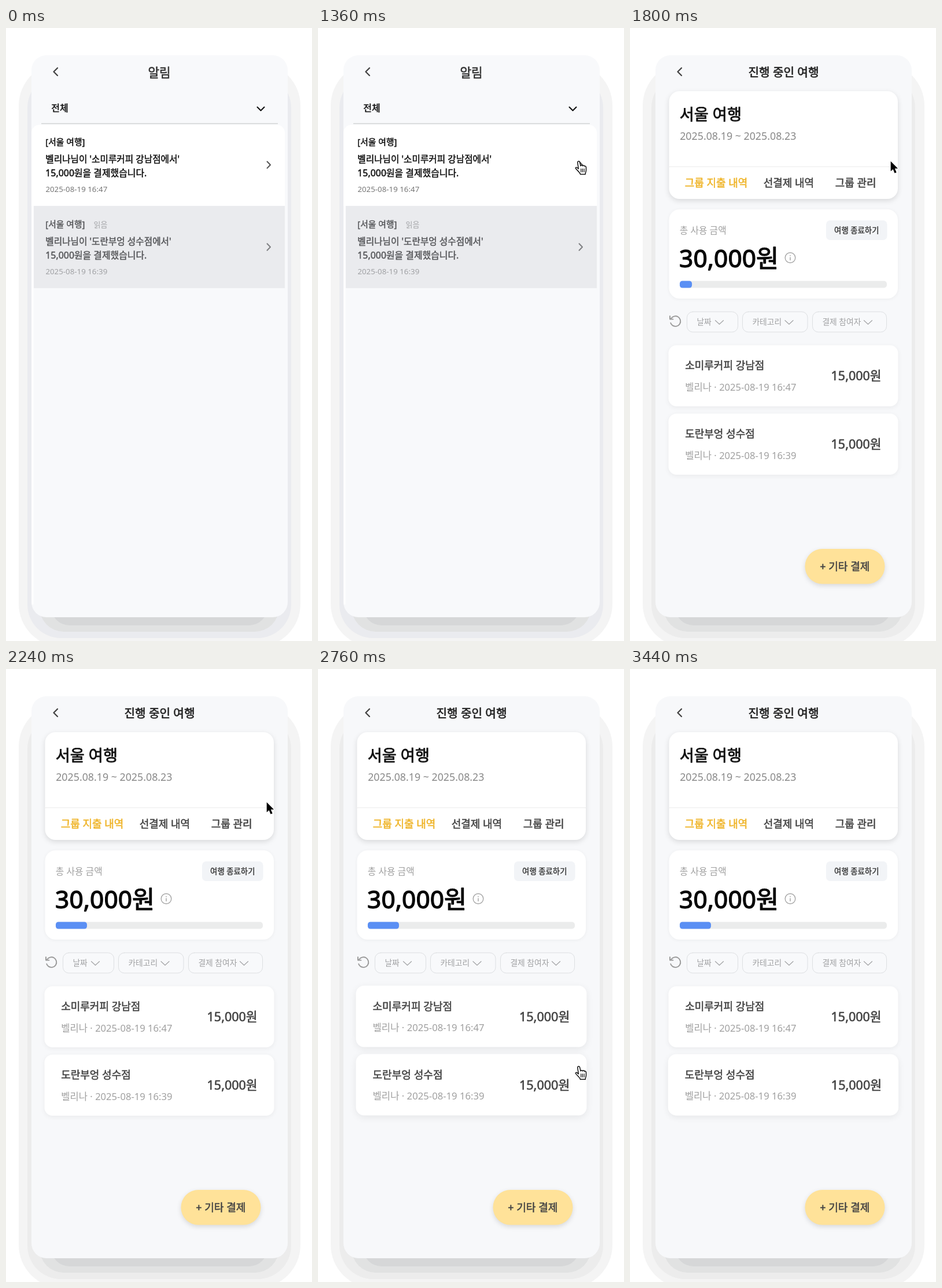
An HTML page with a canvas that plays this animation: 529 px wide and 1058 px high, repeating every 3.48 s.

```html
<!DOCTYPE html>
<html lang="ko">
<head>
<meta charset="utf-8">
<style>
html, body { margin: 0; width: 100%; height: 100%; overflow: hidden; background: #fff; }
canvas { display: block; }
</style>
</head>
<body>
<canvas id="stage" width="529" height="1058"></canvas>
<script>
const ctx = document.getElementById('stage').getContext('2d');
const FONT = '"Noto Sans", "Noto Sans CJK KR", "Noto Sans CJK", sans-serif';
const LOOP = 3480;
const CURSOR_IN = 1280, PAGE_SWITCH = 1600, DATA_LOADED = 1680;
const MOVE_START = 2240, MOVE_END = 2790, CURSOR_OUT = 3280;
const USER = '벨리나', CAFE = '소미루커피 강남점', DINER = '도란부엉 성수점';

const HAND = new Path2D('M-2 1.8C-2-.6 1.3-.6 1.8 1.6L3.3 8C3.6 6.5 6 6.4 6.7 8C7.4 6.8 9.4 7 10 8.6' +
  'C11.2 7.8 12.7 8.6 12.8 10.5V15.5C12.8 18 11.6 19 11.4 22.5H2.8C2.5 19.5-1.5 17-5.2 12.5C-6 10.8-4.3 9.8-2.8 11L-.4 13Z');
const FOLDS = new Path2D('M4 13V18.5M6.7 13V18.5M9.4 13V18.5');
const ARROW = new Path2D('M0 0V17.3L4 13.7L6.8 20.6L10 19.2L7.1 12.6H12.4Z');

const clamp = x => Math.max(0, Math.min(1, x));

// CSS "ease": cubic-bezier(.25, .1, .25, 1)
function ease(x) {
  x = clamp(x);
  if (x === 0 || x === 1) return x;
  const bezier = (s, a, b) => 3 * s * (1 - s) ** 2 * a + 3 * s * s * (1 - s) * b + s ** 3;
  let lo = 0, hi = 1;
  for (let i = 0; i < 20; i++) {
    const mid = (lo + hi) / 2;
    if (bezier(mid, 0.25, 0.25) < x) lo = mid; else hi = mid;
  }
  return bezier(lo, 0.1, 1);
}

// Transition that starts at `enter` and reverses at `leave`.
function hover(t, enter, leave) {
  const v = ease((Math.min(t, leave) - enter) / 300);
  return t < leave || v === 0 ? v : v * (1 - ease((t - leave) / (300 * v)));
}

function box(x, y, w, h, r, fill, stroke) {
  ctx.beginPath();
  ctx.roundRect(x, y, w, h, r);
  if (fill) { ctx.fillStyle = fill; ctx.fill(); }
  if (stroke) { ctx.strokeStyle = stroke; ctx.lineWidth = 1; ctx.stroke(); }
}

function raised(x, y, w, h, r, fill, blur, drop, alpha) {
  ctx.save();
  ctx.shadowColor = `rgba(0,0,0,${alpha})`;
  ctx.shadowBlur = blur;
  ctx.shadowOffsetY = drop;
  box(x, y, w, h, r, fill);
  ctx.restore();
}

// Text placed by its left edge (or middle) and its vertical centre.
function text(str, x, cy, size, color, align = 'left') {
  ctx.font = `${size}px ${FONT}`;
  ctx.textAlign = align;
  ctx.fillStyle = color;
  ctx.fillText(str, align === 'left' ? x - size * 0.045 : x, cy + size * 0.37);
}

// Medium weight: regular glyphs thickened by a thin outline.
function mediumText(str, x, cy, size, color, align = 'left') {
  text(str, x, cy, size, color, align);
  ctx.strokeStyle = color;
  ctx.lineWidth = size * 0.03;
  ctx.lineJoin = 'round';
  ctx.strokeText(str, align === 'left' ? x - size * 0.045 : x, cy + size * 0.37);
}

function line(color, width, ...pts) {
  ctx.strokeStyle = color;
  ctx.lineWidth = width;
  ctx.lineCap = ctx.lineJoin = 'round';
  ctx.beginPath();
  for (let i = 0; i < pts.length; i += 2) ctx.lineTo(pts[i], pts[i + 1]);
  ctx.stroke();
}

function phone(panel, edge) {
  ctx.fillStyle = '#fff';
  ctx.fillRect(0, 0, 529, 1058);
  box(22, 60, 487, 1008, 74, '#f4f4f4');
  box(37, 80, 456, 973, 58, edge);
  box(58, 900, 414, 142, 42, '#e1e2e2');
  box(78, 900, 374, 131, 32, '#d6d7d8');
  box(44, 47, 443, 970, 26, panel);
  line('#444', 2.3, 89, 69, 82.5, 75.5, 89, 82);
}

function notice(y, place, time, read) {
  const main = read ? '#57585b' : '#111';
  mediumText('[서울 여행]', 69, y, 14.8, main);
  if (read) text('읽음', 152, y + 0.5, 13, '#a3a4a7');
  mediumText(`${USER}님이 '${place}에서'`, 69, y + 29.5, 15.7, main);
  mediumText('15,000원을 결제했습니다.', 69, y + 53.5, 15.9, main);
  text(`2025-08-19 ${time}`, 69, y + 81.3, 13.3, read ? '#a0a1a4' : '#777');
  line(read ? '#808184' : '#555', 2, 451.5, y + 34, 457, y + 39.7, 451.5, y + 45.4);
}

function noticesPage() {
  phone('#f8f9fb', '#eaebef');
  mediumText('알림', 265, 77, 21.3, '#333', 'center');
  mediumText('전체', 79, 138, 16, '#111');
  line('#111', 2.1, 434.5, 136.5, 440.5, 142.5, 446.5, 136.5);
  box(44.5, 180, 3, 815, 1, '#fff');
  box(44, 167, 438, 140, [14, 14, 0, 0], '#fff');
  ctx.fillStyle = '#c2c3c4';
  ctx.fillRect(61, 164.5, 409, 1);
  ctx.fillStyle = '#eaebee';
  ctx.fillRect(48, 307, 434, 142);
  notice(196.5, CAFE, '16:47', false);
  notice(338.3, DINER, '16:39', true);
}

function filterChip(x, w, cy, label, arrowX) {
  box(x + 0.5, cy - 17.5, w - 1, 35, 10, '#f8f9fb', '#dddfe2');
  text(label, x + 18, cy, 13.8, '#a0a1a3');
  line('#a5a6a8', 1.3, arrowX, cy - 2.5, arrowX + 7, cy + 4, arrowX + 14, cy - 2.5);
}

function resetIcon(cy) {
  ctx.strokeStyle = '#999';
  ctx.lineWidth = 1.9;
  ctx.beginPath();
  ctx.arc(78.5, cy, 8.8, -2.6, 2.8);
  ctx.stroke();
  line('#999', 1.9, 69, cy - 9, 69, cy - 3.5, 74.5, cy - 3.5);
}

function infoIcon(x, y) {
  ctx.strokeStyle = '#a5a5a5';
  ctx.lineWidth = 1.4;
  ctx.beginPath();
  ctx.arc(x, y, 8.8, 0, Math.PI * 2);
  ctx.stroke();
  line('#a5a5a5', 1.5, x, y - 0.5, x, y + 4);
  line('#a5a5a5', 1.7, x, y - 3.8, x, y - 3.7);
}

function expense(cy, place, time, p) {
  ctx.save();
  ctx.translate(265, cy - 3 * p);
  ctx.scale(1 + 0.02 * p, 1 + 0.02 * p);
  ctx.translate(-265, 0);
  raised(66.5, -52.8, 397, 105.6, 14, '#fff', 8 + 20 * p, 2 + 6 * p, 0.06 + 0.07 * p);
  mediumText(place, 96, -17.4, 18, '#444');
  text(`${USER} · 2025-08-19 ${time}`, 96, 19.3, 16.6, '#a0a0a0');
  mediumText('15,000원', 348.5, 0.3, 21.5, '#444');
  ctx.restore();
}

function tripPage(t) {
  const loaded = t >= DATA_LOADED;
  const shift = loaded ? 10.5 : 0;
  phone('#f7f8fa', '#ececec');
  if (loaded) mediumText('진행 중인 여행', 265.5, 77, 20.2, '#222', 'center');

  raised(67.5, 109, 395.5, 186, 18, '#fff', 10, 3, 0.13);
  mediumText('서울 여행', 87, 149, 27.2, '#111');
  text('2025.08.19 ~ 2025.08.23', 87, 186.3, 17.8, '#888');
  ctx.fillStyle = '#ebebeb';
  ctx.fillRect(67.5, 239, 395.5, 1);
  mediumText('그룹 지출 내역', 95.5, 267, 18, '#efb428');
  mediumText('선결제 내역', 231.5, 267, 18, '#444');
  mediumText('그룹 관리', 355.5, 267, 18, '#444');

  raised(67.5, 313, 395.5, 143.5 + shift, 18, '#fff', 6, 1, 0.05);
  text('총 사용 금액', 86.5, 344 + shift / 2, 15.8, '#a0a0a0');
  mediumText(loaded ? '30,000원' : '0원', 87, 386.3 + shift, 42.5, '#080808');
  infoIcon(loaded ? 277 : 166, 386 + shift);
  box(86, 426 + shift, 358, 12, 5, '#ebecec');
  if (loaded) {
    box(339, 332, 105.5, 34, 7, '#f2f4f7');
    mediumText('여행 종료하기', 391.8, 349, 13.4, '#333', 'center');
    const filled = 54 * ease((t - DATA_LOADED) / 500);
    box(86, 426 + shift, filled, 12, Math.min(4.5, filled / 2), '#5a8ff4');
  }

  const row = 496.8 + shift;
  resetIcon(row - 1.2);
  filterChip(98, 89, row, '날짜', 147.5);
  filterChip(194, 113.5, row, '카테고리', 268);
  filterChip(315, 129, row, '결제 참여자', 404.5);

  if (loaded) {
    expense(600.2, CAFE, '16:47', hover(t, 2582, 2691));
    expense(718.2, DINER, '16:39', hover(t, 2710, CURSOR_OUT));
  }

  raised(302.5, 899, 138, 60.5, 30, '#ffe299', 8, 3, 0.13);
  mediumText('+ 기타 결제', 371.3, 929.3, 18.1, '#444', 'center');
}

function cursor(t) {
  if (t < CURSOR_IN || t >= CURSOR_OUT + 40) return;
  const move = 0.5 - 0.5 * Math.cos(Math.PI * clamp((t - MOVE_START) / (MOVE_END - MOVE_START)));
  const y = 230 + 459 * move;
  const pointing = t < PAGE_SWITCH || (y > 547 && y < 653) || y > 665;
  ctx.save();
  ctx.globalAlpha = t < CURSOR_OUT ? clamp((t - CURSOR_IN + 40) / 120) : 0.5;
  ctx.translate(450.7, y);
  ctx.lineJoin = ctx.lineCap = 'round';
  if (pointing) {
    ctx.fillStyle = '#fff';
    ctx.strokeStyle = '#111';
    ctx.lineWidth = 1.5;
    ctx.fill(HAND);
    ctx.stroke(HAND);
    ctx.lineWidth = 1.2;
    ctx.stroke(FOLDS);
  } else {
    ctx.strokeStyle = '#fff';
    ctx.lineWidth = 2.4;
    ctx.stroke(ARROW);
    ctx.fillStyle = '#000';
    ctx.fill(ARROW);
  }
  ctx.restore();
}

function frame() {
  const t = performance.now() % LOOP;
  if (t < PAGE_SWITCH) noticesPage(); else tripPage(t);
  cursor(t);
  requestAnimationFrame(frame);
}
frame();
</script>
</body>
</html>
```
